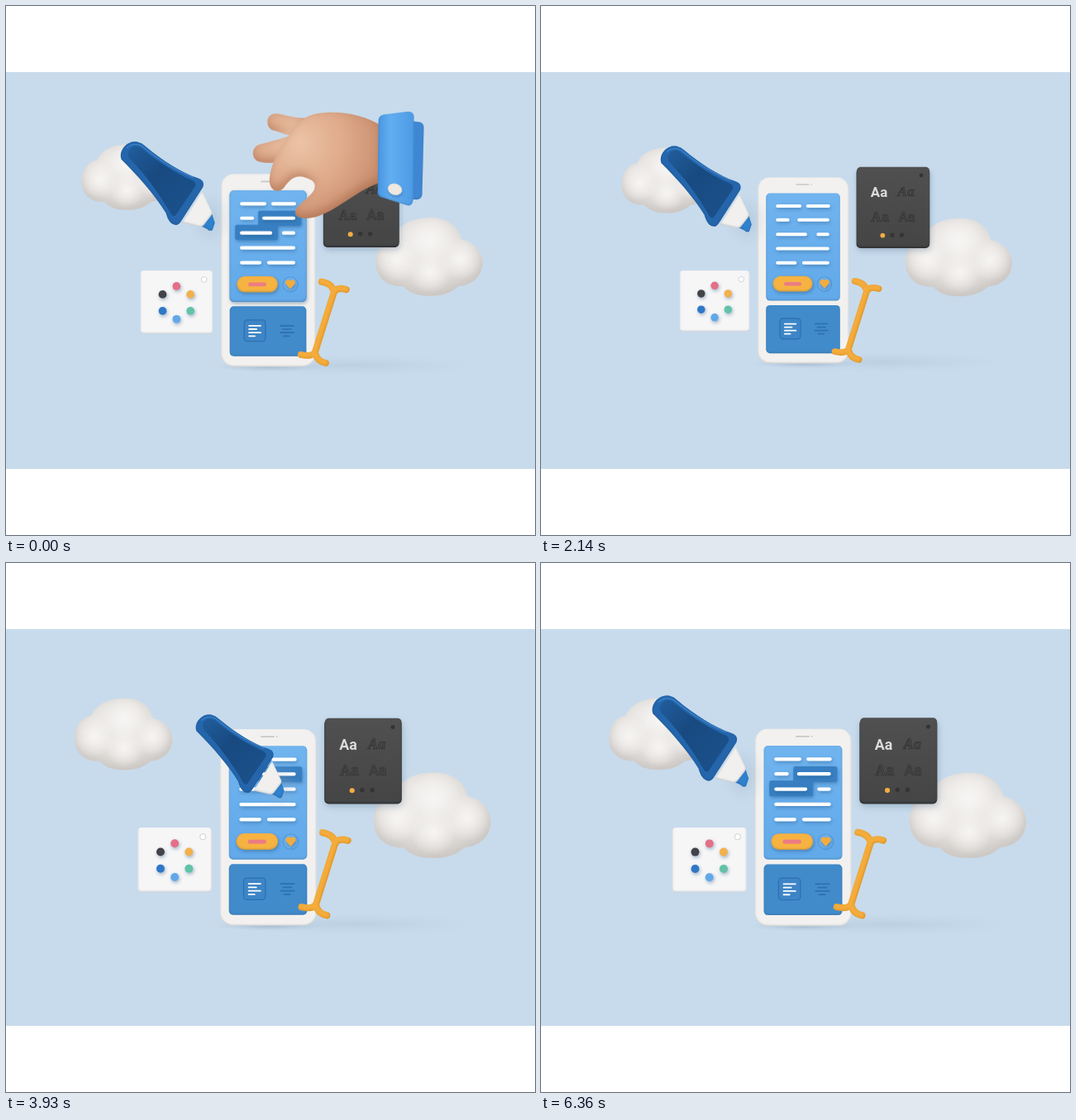
Animation of 640x640 px, one loop 6.43 s. Source, as an HTML page:

```html
<!DOCTYPE html>
<html lang="en">
<head>
<meta charset="utf-8">
<title>Mobile editor illustration</title>
<style>
  html, body { margin: 0; width: 100%; height: 100%; overflow: hidden; background: #fff; }
  svg { display: block; width: 100%; height: 100%; }
  .sans { font: 700 17.5px Roboto, sans-serif; }
  .slab { font: 700 17px "Noto Serif", serif; }
  .script { font: italic 700 18px "Liberation Serif", serif; }
  .thin { font: 500 17.5px Roboto, sans-serif; }
  .engraved { fill: #454545; stroke: #303030; stroke-width: .6; filter: drop-shadow(.5px .7px 0 #6665); }
  .lift { filter: drop-shadow(1px 2px 2px #1b4a7a66); }
  .float { filter: drop-shadow(1px 3px 4px #4c6a8a55); }
  .round { fill: none; stroke-linecap: round; stroke-linejoin: round; }
</style>
</head>
<body>
<svg viewBox="0 0 640 640" preserveAspectRatio="none">
  <defs id="filters"></defs>
  <defs>
    <clipPath id="stage"><rect y="80" width="640" height="480"/></clipPath>
    <linearGradient id="sky" x2="0" y2="1">
      <stop stop-color="#70b4ef"/><stop offset="1" stop-color="#62a9ea"/>
    </linearGradient>
    <linearGradient id="charcoal" x2="0" y2="1">
      <stop stop-color="#505050"/><stop offset="1" stop-color="#454545"/>
    </linearGradient>
    <linearGradient id="barrel" x2="1" y2="1">
      <stop stop-color="#215d9c"/><stop offset=".4" stop-color="#184a80"/><stop offset="1" stop-color="#1b528d"/>
    </linearGradient>
    <radialGradient id="skin" gradientUnits="userSpaceOnUse" cx="355" cy="165" r="105">
      <stop stop-color="#ecc3a7"/><stop offset=".5" stop-color="#dfab8b"/><stop offset="1" stop-color="#c88e6d"/>
    </radialGradient>
    <linearGradient id="cuff" x2="1">
      <stop stop-color="#4795e2"/><stop offset=".35" stop-color="#62aef2"/><stop offset="1" stop-color="#4d9ae5"/>
    </linearGradient>
    <radialGradient id="ground">
      <stop stop-color="#829bb5" stop-opacity=".5"/><stop offset="1" stop-color="#a9c0d6" stop-opacity="0"/>
    </radialGradient>
    <radialGradient id="fluff" cx=".45" cy=".3" r=".72">
      <stop stop-color="#f1efed"/><stop offset=".55" stop-color="#e5e2df"/><stop offset="1" stop-color="#d3cfcc"/>
    </radialGradient>
    <radialGradient id="lobe">
      <stop stop-color="#f7f5f3"/><stop offset="1" stop-color="#f7f5f3" stop-opacity="0"/>
    </radialGradient>

    <g id="cloud">
      <path fill="url(#fluff)" filter="url(#puff)"
        d="M-56 8C-57-8-48-20-37-21C-30-36-14-41 2-41C20-41 31-31 34-18C48-15 57-4 56 8C55 22 44 30 31 31C22 39 10 42-2 41C-14 41-22 37-27 31C-43 32-55 23-56 8Z"/>
      <g fill="url(#lobe)">
        <circle cx="2" cy="-17" r="24"/><circle cx="-33" cy="3" r="23"/>
        <circle cx="33" cy="3" r="22"/><circle cx="1" cy="16" r="22"/>
      </g>
    </g>

    <rect id="panel" x="270.5" y="223" width="93" height="135" rx="5" fill="url(#sky)" filter="url(#edge)"/>

    <g id="ink">
      <path class="round lift" stroke="#fff" stroke-width="4.2"
        d="M285 239h28M323 239h26M285 256.500h13M312 256.500h36M285 274.500h35M336 274.500h12M285 292.500h63M285 310.500h22M318 310.500h30"/>
      <g class="lift">
        <rect x="279" y="327" width="50" height="19.500" rx="9.750" fill="#f6b341" filter="url(#edge)"/>
        <rect x="293" y="334.500" width="22" height="4.800" rx="2.400" fill="#ec7c83"/>
      </g>
      <circle cx="344" cy="337" r="9" fill="#6fb2ed" stroke="#529bdc" stroke-width="1.300"/>
      <path class="lift" fill="#f2ac3d" d="M344 342.500l-5.500-6a3.500 3.500 0 0 1 5.500-4.200a3.500 3.500 0 0 1 5.500 4.200z"/>
    </g>
  </defs>

  <rect width="640" height="640" fill="#fff"/>
  <g clip-path="url(#stage)">
    <rect y="80" width="640" height="480" fill="#c8dbec"/>

    <g id="zoom">
      <ellipse cx="420" cy="435" rx="160" ry="13" fill="url(#ground)" opacity=".38"/>
      <ellipse cx="318" cy="437" rx="68" ry="6" fill="url(#ground)"/>
      <use href="#cloud" id="leftCloud"/>
      <use href="#cloud" id="rightCloud"/>

      <g>
        <rect x="384" y="192" width="92" height="100" rx="5" fill="#343434" class="float"/>
        <rect x="384.500" y="190" width="91.500" height="100" rx="5" fill="url(#charcoal)" filter="url(#edge)"/>
        <g text-anchor="middle">
          <text class="sans" x="412.500" y="227.500" fill="#dcdcdc">Aa</text>
          <text class="script engraved" x="446.500" y="227">Aa</text>
          <text class="slab engraved" x="414" y="258.500">Aa</text>
          <text class="thin engraved" x="447.500" y="258.500">Aa</text>
        </g>
        <circle cx="417" cy="276" r="3" fill="#f3ad43"/>
        <g fill="#343434">
          <circle cx="429" cy="275.500" r="2.700"/><circle cx="441" cy="275.500" r="2.700"/>
          <circle cx="465.500" cy="200.500" r="3" stroke="#5b5b5b" stroke-width=".6"/>
        </g>
      </g>

      <g>
        <path d="M260 253v22M260 282v12" stroke="#d5d9de" stroke-width="3"/>
        <rect x="260" y="203" width="114.500" height="234" rx="15" fill="#f2f1ef" filter="url(#edge)"/>
        <path class="round" stroke="#c9c8c6" stroke-width="1.700" d="M309 212h15M327.500 212h.1"/>
        <rect x="270.500" y="363.500" width="93" height="60.500" rx="5" fill="#418bcb" filter="url(#edge)"/>
        <rect x="288" y="380" width="26" height="26" rx="4" fill="#3d85c6" stroke="#2d6fb0" stroke-width="1.200"/>
        <path class="round" stroke="#fff" stroke-width="1.800" d="M294 387h14M294 391.200h9M294 395.400h14M294 399.600h7"/>
        <path class="round" stroke="#2c70b0" stroke-width="1.700" d="M332 387h16M335 391.200h10M332 395.400h16M336 399.600h7"/>
        <use href="#panel"/>
        <g class="lift" fill="#377fc2">
          <rect id="upperMark" y="247.500" height="18.500" rx="2.500"/>
          <rect id="lowerMark" y="264.500" height="18.500" rx="2.500"/>
        </g>
        <use href="#ink"/>
      </g>

      <g id="paper">
        <use href="#panel" class="lift"/>
        <path class="lift" fill="#377fc2" d="M307 247.500h48q2.500 0 2.500 2.500v13.500q0 2.500-2.500 2.500h-26v14.500q0 2.500-2.500 2.500h-47q-2.500 0-2.500-2.500v-13.500q0-2.500 2.500-2.500h25.500v-14.500q0-2.500 2-2.500z"/>
        <use href="#ink"/>
      </g>

      <g>
        <rect x="162" y="320" width="88" height="77" rx="4" fill="#f6f6f7" filter="url(#edge)"/>
        <g id="swatches" class="lift"></g>
        <circle cx="239.500" cy="331" r="3.400" fill="#fff" stroke="#d0d3d7" stroke-width="1"/>
      </g>

      <g id="caret">
        <path class="round" filter="url(#tube)" stroke="#f4ad3c" stroke-width="8"
          d="M382 327.500Q395 329.500 397 340L374 413Q370 419 357 416M412 337Q401 333.500 397 340M374 413Q376 424 387 426"/>
      </g>

      <g id="marker">
        <ellipse cx="246" cy="258" rx="28" ry="36" fill="url(#ground)" opacity=".6"/>
        <path fill="#2f80cd" filter="url(#edge)" d="M236 266L249 251.500L252.500 262L249.500 271Q246 273 243 269.500Z"/>
        <path fill="#f1f0ee" filter="url(#edge)" d="M213 262L237 224L248.500 248Q250 251 247.500 254L239 265Q236 268 232 266.500Z"/>
        <path fill="#2466ad" filter="url(#edge)"
          d="M139 185C135 174 147 161 159 164Q164 165 168 169C188 186 212 201 232 208Q241 211 238 219L211 261Q206 268 199 262Q195 258 193 250C179 227 158 204 139 185Z"/>
        <path fill="url(#barrel)"
          d="M148 183Q145 174 153 170Q159 167 165 173C186 190 207 203 226 211Q231 214 228 219L205 253Q201 256 198 249C184 225 167 202 148 183Z"/>
        <path class="round" stroke="#2665a9" stroke-width="5" d="M234 216L206 260"/>
        <path class="round" stroke="#4a93d8" stroke-width="1.300" opacity=".6" d="M146 171Q154 164 164 169C186 187 208 200 226 207"/>
      </g>

      <g id="hand">
        <g fill="url(#skin)" filter="url(#flesh)">
          <path d="M366 135C350 136 336 130 326 129.500C313 130 314 148 324 150C335 154 347 158 356 157Z"/>
          <path d="M350 154C335 160 319 164 307 167C295 171 297 186 307 188C318 191 332 189 345 182Z"/>
        </g>
        <path fill="url(#skin)" filter="url(#flesh)"
          d="M456 145C432 130 400 125 375 130C360 133 350 143 345 153C335 165 322 185 319 207C317 222 328 228 336 220C343 209 351 203 362 207C372 210 376 214 373 222C367 233 352 240 350 248C349 257 362 259 378 254C405 244 425 222 456 212Z"/>
        <path fill="#3f87d3" filter="url(#edge)" d="M484 138L501 140Q506 141 506 147L504 228Q503 234 497 234L483 233Z"/>
        <path fill="url(#cuff)" filter="url(#edge)" d="M457 131L487 127Q494 127 494 134L493 235Q492 242 486 241L454 231Q449 229 450 223L451 137Q452 132 457 131Z"/>
        <ellipse class="lift" cx="471" cy="221.500" rx="8.800" ry="7" transform="rotate(18 471 221.500)" fill="#eee9e0"/>
      </g>
    </g>
  </g>
</svg>

<script>
const LOOP = 6430;
const $ = id => document.getElementById(id);
const place = (id, transform) => $(id).setAttribute('transform', transform);

// Inner shading: darkens the part of a shape that its shifted, blurred copy leaves uncovered.
const shading = (id, blur, dx, dy, color, opacity) => `
  <filter id="${id}" x="-20%" y="-20%" width="140%" height="140%" color-interpolation-filters="sRGB">
    <feGaussianBlur in="SourceAlpha" stdDeviation="${blur}"/>
    <feOffset dx="${dx}" dy="${dy}" result="core"/>
    <feFlood flood-color="${color}" flood-opacity="${opacity}"/>
    <feComposite operator="in" in2="SourceAlpha"/>
    <feComposite operator="out" in2="core" result="shade"/>
    <feMerge><feMergeNode in="SourceGraphic"/><feMergeNode in="shade"/></feMerge>
  </filter>`;
$('filters').innerHTML =
  shading('puff', 6, -1, -4, '#b9b3ae', .4) +
  shading('edge', 1.3, -.4, -1, '#203850', .25) +
  shading('tube', 1.6, -1, -1, '#c27614', .5) +
  shading('flesh', 6, -2, -5, '#9c5b3f', .5);

const colors = ['#e46f89', '#f1b14c', '#61c2a8', '#62a8e9', '#2f77c7', '#424249'];
$('swatches').innerHTML = colors.map((color, i) => {
  const angle = i * Math.PI / 3;
  return `<circle cx="${206 + 19.5 * Math.sin(angle)}" cy="${359 - 20 * Math.cos(angle)}" r="4.9" fill="${color}"/>`;
}).join('');

const wave = (t, period, start) => Math.cos(2 * Math.PI * (t - start) / period);
const ramp = (t, from, to) => {
  const u = Math.min(1, Math.max(0, (t - from) / (to - from)));
  return u * u * (3 - 2 * u);
};

// Marker stops: time, x shift, y shift, size
const stops = [
  [0, 0, 0, 1], [2.15, 0, 0, 1], [2.8, 106, -5, .93], [2.9, 106, -5, .93], [3.35, 56, -5, .93],
  [3.85, 85, 13.5, .92], [4, 83, 13.5, .92], [4.45, 28, 13.5, .93], [5.1, 0, 0, 1], [7, 0, 0, 1]
];
function markerPose(t) {
  const i = stops.findIndex(stop => stop[0] > t);
  const [a, b] = [stops[i - 1], stops[i]];
  const u = ramp(t, a[0], b[0]);
  return [1, 2, 3].map(k => a[k] + (b[k] - a[k]) * u);
}

function mark(id, right, progress) {
  const width = 52 * progress;
  $(id).setAttribute('x', right - width);
  $(id).setAttribute('width', width);
}

function draw() {
  const t = performance.now() % LOOP / 1000;

  const zoom = 1 - .04 * wave(t, 7.04, 1.68);
  place('zoom', `translate(317 320) scale(${zoom}) translate(-317 -320)`);

  const bob = 2.4 - 4.2 * wave(t, 1.17, .5);
  place('caret', `translate(0 ${bob})`);

  const swell = 1 - .037 * wave(t, 2.55, .2);
  place('leftCloud', `translate(145 ${208.5 - bob * .3}) scale(${swell})`);
  place('rightCloud', `translate(512.5 ${305 - bob * .3}) scale(${swell * 1.195})`);

  const [x, y, size] = markerPose(t);
  place('marker', `translate(${250 + x} ${270 + y}) scale(${size}) translate(-250 -270)`);
  mark('upperMark', 357.5, ramp(t, 2.8, 3.35));
  mark('lowerMark', 329, ramp(t, 3.95, 4.45));

  // The hand pulls the sheet away, both turning around the pinch point.
  const away = t / .5, travel = away ** 3.2;
  const carry = angle =>
    `translate(${335 - 85 * travel} ${225 - 30 * travel}) rotate(${angle * away ** 1.5}) translate(-335 -225)`;
  place('hand', carry(-4.2));
  place('paper', carry(-10));
  for (const id of ['hand', 'paper']) $(id).style.display = t < 1.2 ? '' : 'none';

  requestAnimationFrame(draw);
}
draw();
</script>
</body>
</html>
```
